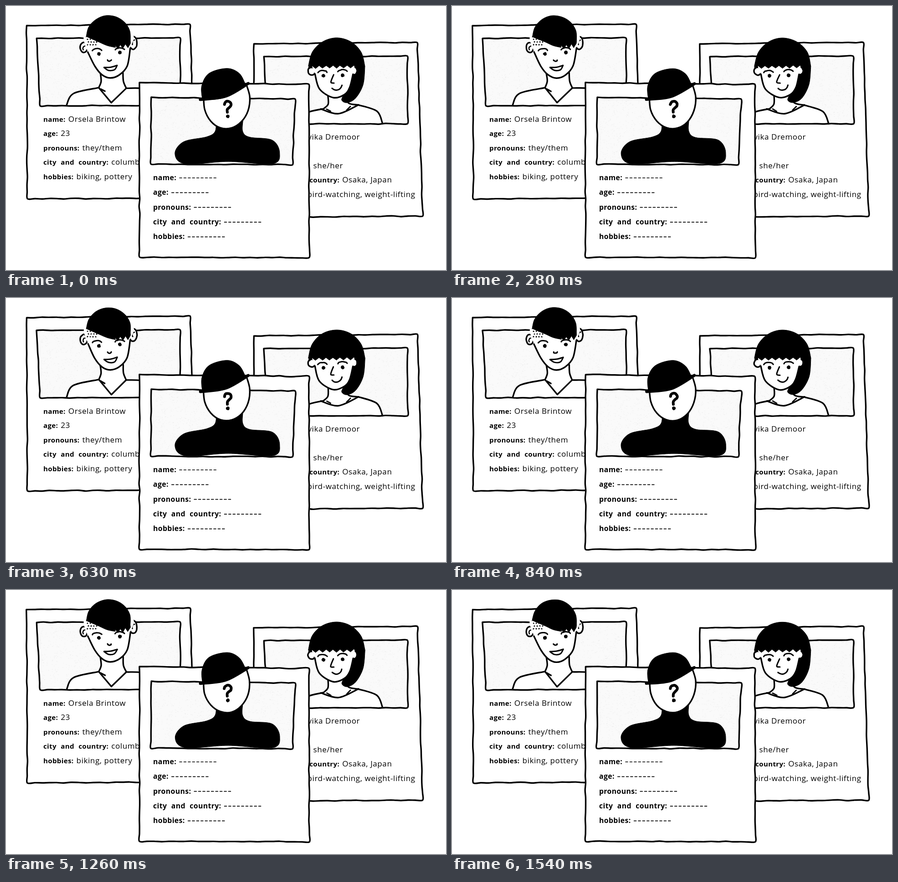
Animation of 966x579 px, one loop 1610 ms. Source, as an HTML page with a canvas:

```html
<!DOCTYPE html>
<html lang="en">
<head>
<meta charset="utf-8">
<title>Profile cards</title>
<style>
  html, body { margin: 0; width: 100%; height: 100%; overflow: hidden; background: #fff; }
  canvas { display: block; }
</style>
</head>
<body>
<canvas id="stage" width="966" height="579"></canvas>
<script>
const ctx = document.getElementById('stage').getContext('2d');
const LOOP = 1610, LINE = 3.4, TURN = Math.PI * 2;
const LABELS = ['name', 'age', 'pronouns', 'city and country', 'hobbies'];
let pose = 0;

const rnd = n => { const s = Math.sin(n * 127.1 + 311.7) * 43758.5453; return s - Math.floor(s); };
const noise = n => rnd(n) * 2 - 1;

// Runs are flat lists of x, y; smooth unless marked sharp.
const sharp = run => Object.assign(run, { sharp: true });

// Ellipse or part of one, angles in turns.
function oval(cx, cy, rx, ry = rx, from = 0, to = 1) {
  const run = [], n = Math.ceil((to - from) * 12);
  for (let i = 0; i <= n; i++) {
    const a = (from + (to - from) * i / n) * TURN;
    run.push(cx + rx * Math.cos(a), cy + ry * Math.sin(a));
  }
  return run;
}

function zigzag(x0, y0, x1, y1, teeth, depth) {
  const run = [], n = teeth * 2;
  for (let i = 0; i <= n; i++) {
    run.push(x0 + (x1 - x0) * i / n, y0 + (y1 - y0) * i / n + (i % 2 ? depth : 0));
  }
  return sharp(run);
}

// Straight sides split into short, slightly uneven steps.
function wavy(corners) {
  const run = [], n = corners.length;
  for (let i = 0; i < n; i += 2) {
    const x = corners[i], y = corners[i + 1];
    const dx = corners[(i + 2) % n] - x, dy = corners[(i + 3) % n] - y;
    const steps = Math.round(Math.hypot(dx, dy) / 16);
    for (let s = 0; s < steps; s++) {
      const px = x + dx * s / steps, py = y + dy * s / steps, amp = s ? 0.7 : 0;
      run.push(px + noise(px + py * 3) * amp, py + noise(px * 2 + py) * amp);
    }
  }
  return run.concat(corners.slice(0, 2));
}

// Boiling line: each point shifts a little with every pose.
function nudge(x, y) {
  const k = x * 0.37 + y * 1.71 + pose * 31.3;
  return [x + noise(k) * 0.4, y + noise(k + 7.7) * 0.4];
}

function trace(run, first) {
  const p = [];
  for (let i = 0; i < run.length; i += 2) p.push(nudge(run[i], run[i + 1]));
  if (first) ctx.moveTo(...p[0]); else ctx.lineTo(...p[0]);
  for (let i = 0; i < p.length - 1; i++) {
    const a = p[i - 1] || p[i], b = p[i], c = p[i + 1], d = p[i + 2] || c;
    if (run.sharp) { ctx.lineTo(...c); continue; }
    ctx.bezierCurveTo(b[0] + (c[0] - a[0]) / 6, b[1] + (c[1] - a[1]) / 6,
      c[0] - (d[0] - b[0]) / 6, c[1] - (d[1] - b[1]) / 6, ...c);
  }
}

function shape(fill, width, ...runs) {
  ctx.beginPath();
  runs.forEach((run, i) => trace(run, i === 0));
  if (fill) { ctx.fillStyle = fill; ctx.fill(); }
  if (width) { ctx.lineWidth = width; ctx.stroke(); }
}

const stroke = (width, ...runs) => runs.forEach(run => shape(null, width, run));
const white = (...runs) => shape('#fff', LINE, ...runs);
const black = (...runs) => shape('#000', 1, ...runs);
const dot = (x, y, r) => shape('#000', 0, oval(x, y, r));
const brow = (x, y) => stroke(3, oval(x, y, 10.5, 5.5, 0.53, 0.95));

function grain(x, y) {
  ctx.save();
  ctx.clip();
  ctx.fillStyle = 'rgba(0,0,0,0.03)';
  for (let i = 0; i < 1500; i++) {
    const k = i + pose * 1777;
    ctx.fillRect(x - 4 + rnd(k) * 324, y - 3 + rnd(k + 0.37) * 156, 1 + rnd(k + 0.7) * 2, 1.3);
  }
  ctx.restore();
}

function card(dx, dy, frame, photo, body, head) {
  const edge = wavy(photo);
  const placed = paint => {
    ctx.save();
    ctx.translate(dx, dy);
    paint();
    ctx.restore();
  };
  placed(() => {
    white(wavy(frame));
    shape('#fafafa', 0, edge);
    grain(photo[0], photo[1]);
  });
  body();
  placed(() => stroke(LINE, edge));
  head();
}

function dashes(x, y) {
  ctx.save();
  ctx.lineWidth = 1.7;
  ctx.setLineDash([4.8, 4.6]);
  ctx.beginPath();
  ctx.moveTo(x + 1, y);
  ctx.lineTo(x + 81, y);
  ctx.stroke();
  ctx.restore();
}

// Without values the answers stay blank.
function profile(x, y, scale, values) {
  ctx.fillStyle = '#000';
  LABELS.forEach((label, i) => {
    const base = y + i * 31.4 * (values ? 1 : 1.03);
    ctx.font = `700 ${15 * scale}px "Open Sans", sans-serif`;
    ctx.letterSpacing = '0.4px';
    ctx.wordSpacing = '5px';
    ctx.fillText(label + ':', x, base);
    const end = x + ctx.measureText(label + ':').width + 6;
    ctx.wordSpacing = '0px';
    if (!values) return dashes(end, base - 5);
    ctx.font = '400 17px "Open Sans", sans-serif';
    ctx.letterSpacing = '0.6px';
    ctx.fillText(values[i], end, base);
  });
}

function leftBody() {
  white([133, 218, 148, 192, 204, 179], [204, 179, 209, 165, 207, 146],
    [257, 146, 258, 165, 264, 180], [264, 180, 310, 184, 335, 218]);
  stroke(LINE, sharp([204, 179, 231, 212, 264, 180]), [208, 182, 217, 187]);
}

function leftHead() {
  white(oval(171, 91, 8, 11));
  white(oval(279, 81, 8.5, 14));
  stroke(2.6, oval(173, 93, 4, 5, 0.4, 0.75), oval(282, 81, 5, 6, 0.4, 0.75));
  const jaw = [180, 101, 195, 132, 211, 151, 229, 158, 249, 151, 266, 131, 273, 92];
  shape('#fff', 0, [273, 92, 274, 60, 177, 60, 180, 101], jaw);
  stroke(LINE, jaw);
  for (let i = 0; i < 12; i++) {
    const line = Math.floor(i / 4);
    dot(179 + i % 4 * 6 + line % 2 * 2, 73 + line * 6, 1.5);
  }
  black(oval(225, 68, 49, 47, 0.5, 1.03), zigzag(273, 82, 240, 86, 3, 9),
    [240, 91, 222, 87, 204, 79, 176, 67]);
  brow(200, 99);
  brow(250, 97);
  stroke(3, oval(227, 118, 4, 3, 0.02, 0.48));
  shape('#fff', 3, [215, 135, 230, 134, 244, 130], [244, 130, 238, 140, 225, 141, 215, 135]);
  dot(204, 105, 4);
  dot(250, 102, 4);
}

function rightBody() {
  white([640, 259, 660, 235, 697, 225], [697, 225, 707, 215, 707, 196],
    [744, 196, 752, 213, 773, 217], [773, 217, 814, 231, 827, 258]);
  stroke(LINE, [691, 226, 730, 236, 774, 217]);
  stroke(2.8, [704, 226, 713, 231], [748, 228, 756, 220]);
}

function rightHead() {
  const jaw = [678, 149, 688, 182, 718, 201, 743, 194, 755, 178, 762, 150];
  black(oval(726, 132, 62, 62, 0.5, 1), [788, 132, 784, 172, 768, 202, 749, 212, 737, 206, 743, 192]);
  white(oval(671, 143, 8, 8.5));
  white(oval(764, 142, 7, 8.5));
  shape('#fff', 0, [762, 150, 758, 125, 678, 125, 678, 149], jaw);
  stroke(LINE, jaw);
  black([664, 136, 675, 108, 726, 90, 770, 110, 768, 133], zigzag(764, 130, 672, 131, 6, 6));
  brow(695, 147);
  brow(739, 145);
  stroke(3, [719, 151, 713, 167, 720, 169], oval(725, 172, 12.5, 12.5, 0.02, 0.38));
  dot(697, 153, 4);
  dot(739, 152, 4);
}

function hiddenBody() {
  black([461, 250, 459, 275, 440, 287, 390, 298, 371, 324, 394, 346, 488, 341,
    585, 346, 601, 322, 585, 294, 535, 288, 520, 275, 520, 250]);
}

function hiddenHead() {
  white(oval(484, 205, 51, 64, -0.09, 0.52));
  black([431, 205, 430, 175, 446, 148, 485, 137, 512, 148, 526, 172], [526, 172, 482, 200, 431, 206]);
  stroke(6.5, [427, 205, 482, 198, 532, 170]);
  stroke(6, oval(487, 216, 7.5, 7, 0.5, 1.17).concat(486, 227, 486, 233));
  dot(487, 242, 4);
}

function draw() {
  ctx.fillStyle = '#fff';
  ctx.fillRect(0, 0, 966, 579);
  ctx.strokeStyle = '#000';
  ctx.lineCap = ctx.lineJoin = 'round';

  const frame = [45, 43, 404, 40, 416, 421, 47, 423];
  const photo = [67, 71, 382, 70, 383, 218, 75, 219];
  card(0, 0, frame, photo, leftBody, leftHead);
  profile(82, 254, 1, ['Orsela Brintow', '23', 'they/them', 'columbus, usa', 'biking, pottery']);
  card(499, 40, frame, photo, rightBody, rightHead);
  profile(589, 293, 1, ['Tavika Dremoor', '27', 'she/her', 'Osaka, Japan', 'bird-watching, weight-lifting']);
  card(0, 0, [293, 168, 665, 172, 666, 552, 293, 551], [319, 200, 635, 204, 629, 348, 318, 347],
    hiddenBody, hiddenHead);
  profile(323, 382, 1.05);
}

// Poses are held for 70 ms and 140 ms in turn.
const poseAt = t => 2 * Math.floor(t / 210) + (t % 210 >= 70 ? 1 : 0);

const start = performance.now();
draw();
function tick() {
  const next = poseAt((performance.now() - start) % LOOP);
  if (next !== pose) { pose = next; draw(); }
  requestAnimationFrame(tick);
}
requestAnimationFrame(tick);
</script>
</body>
</html>
```
